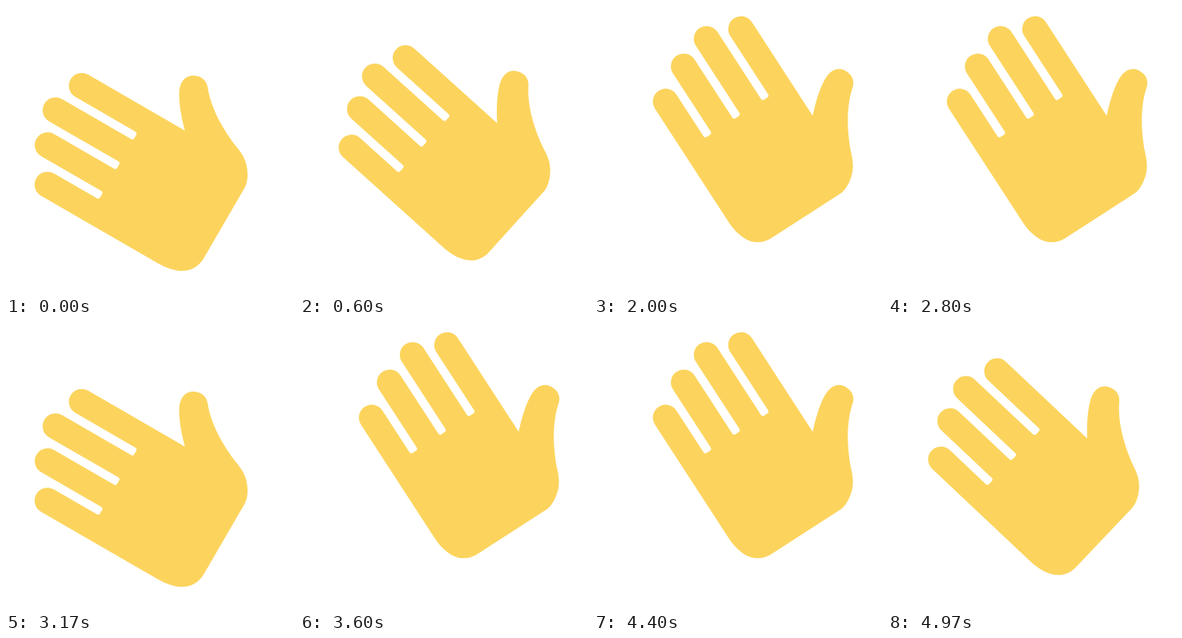
These frames come from a looping animation (360 px wide and 360 px high, 5000 ms). An HTML page with a canvas:

```html
<!DOCTYPE html>
<html lang="en">
<head>
<meta charset="utf-8">
<title>Waving hand</title>
<style>
  html, body { margin: 0; width: 100%; height: 100%; overflow: hidden; background: #fff; }
  canvas { display: block; width: 360px; height: 360px; }
</style>
</head>
<body>
<canvas id="stage"></canvas>
<script>
const SIZE = 360, LOOP = 5000, DEG = Math.PI / 180;
const canvas = document.getElementById('stage');
const ctx = canvas.getContext('2d');
const dpr = window.devicePixelRatio || 1;
canvas.width = canvas.height = SIZE * dpr;

// The hand lies along the x axis, fingertips to the left.
function makeHand() {
  const p = new Path2D();
  const r = 16.05, pitch = 42.8, first = 39.05, slotEnd = 221.5;
  const tips = [131.8, 118.7, 132, 156.5];

  p.moveTo(271.5, 23);
  tips.forEach((x, k) => {
    const y = first + k * pitch;
    p.lineTo(x, y - r);
    p.arc(x, y, r, -Math.PI / 2, Math.PI / 2, true);
    if (k < tips.length - 1) {
      const next = y + pitch - r;
      p.arcTo(slotEnd, y + r, slotEnd, next, 3);
      p.arcTo(slotEnd, next, x, next, 3);
    }
  });

  // heel and wrist
  p.lineTo(325, 183.5);
  p.bezierCurveTo(350, 183.5, 371.5, 174, 371.7, 149);
  p.lineTo(372, 48);
  p.bezierCurveTo(372, 42, 370, 37, 366.5, 30.9);

  // thumb
  p.bezierCurveTo(357, 14.4, 343.4, 10.7, 332.8, 6.5);
  p.bezierCurveTo(311.2, -3, 285.7, -17.1, 268.7, -38.5);
  p.bezierCurveTo(262.9, -45.6, 253.9, -46.2, 246.1, -41.7);
  p.bezierCurveTo(236.6, -36.2, 235.1, -24.9, 243.5, -11.3);
  p.bezierCurveTo(250, 0, 261, 12.5, 271.5, 23);
  p.closePath();
  return p;
}

const hand = makeHand();
const anchor = { x: 205, y: 195 };
const shift = { x: 37.7, y: -34.7 };

// 20 poses per wave at 25 per second, shown on a 30 Hz clock.
function swing(ms) {
  const tick = Math.floor(ms * 0.03 + 0.11);
  const pose = Math.floor(tick * 5 / 6 + 1e-6) % 20;
  return pose <= 9 ? pose / 9 : (19 - pose) / 10;
}

function draw(ms) {
  const u = swing(ms % LOOP);
  ctx.setTransform(dpr, 0, 0, dpr, 0, 0);
  ctx.fillStyle = '#fff';
  ctx.fillRect(0, 0, SIZE, SIZE);
  ctx.translate(anchor.x + shift.x * u, anchor.y + shift.y * u);
  ctx.rotate(30 * u * DEG);
  ctx.translate(-anchor.x, -anchor.y);
  ctx.rotate(30 * DEG);
  ctx.fillStyle = '#fcd45d';
  ctx.fill(hand);
}

const start = performance.now();
function tick() {
  draw(Math.max(0, performance.now() - start));
  requestAnimationFrame(tick);
}
tick();
</script>
</body>
</html>
```
